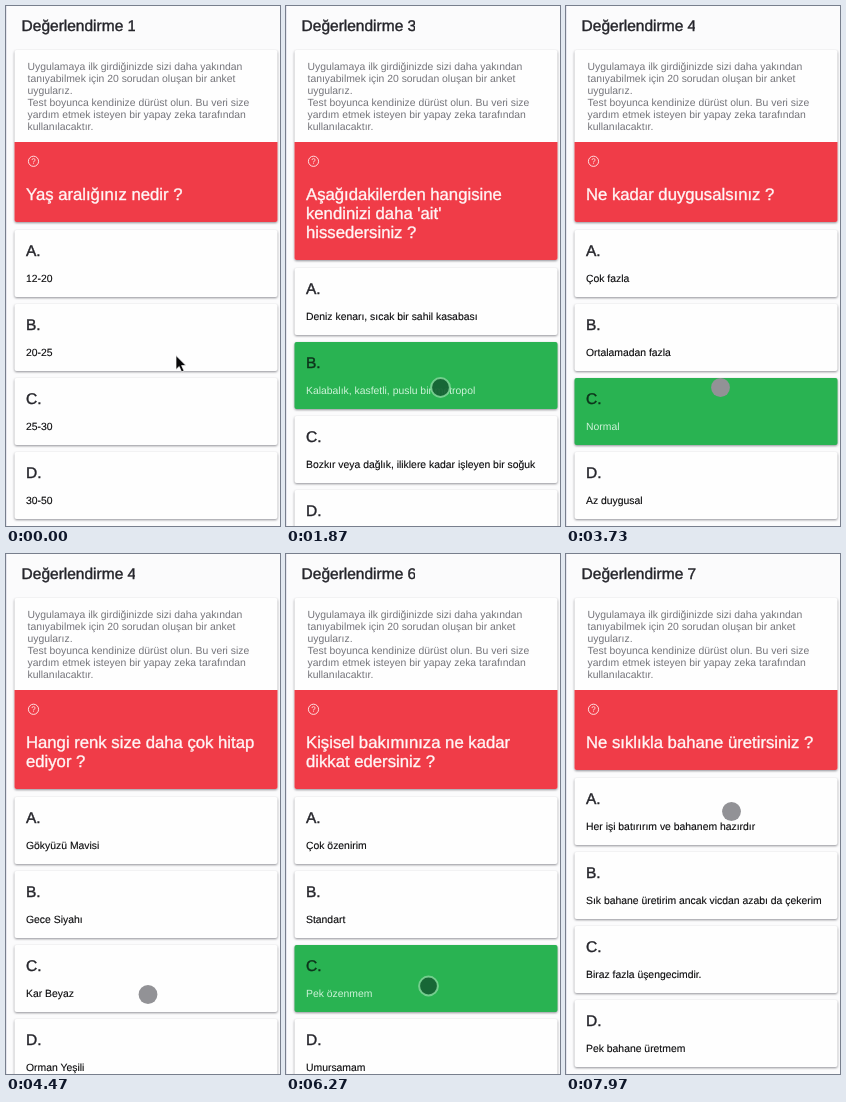
These frames come from a looping animation (274x520 px, 8000 ms). An HTML page:

```html
<!DOCTYPE html>
<html lang="tr">
<head>
<meta charset="utf-8">
<title>Değerlendirme</title>
<style>
  html, body { margin: 0; width: 100%; height: 100%; overflow: hidden; background: #fbfbfc; }
  svg { display: block; width: 100vw; height: 100vh; }
  text { font-family: "Liberation Sans", Arial, sans-serif; white-space: pre; text-rendering: geometricPrecision; }
  .card { filter: drop-shadow(0 1px 1px rgba(40, 40, 50, .5)); }
  .head { font-size: 15.5px; fill: #25252b; stroke: #25252b; stroke-width: .4px; }
  .intro { font-size: 10.4px; fill: #74747a; }
  .ask { font-size: 16.7px; fill: #fff6f6; stroke: #fff6f6; stroke-width: .35px; }
  .opt { font-size: 10.4px; fill: #0a0a0c; stroke: #0a0a0c; stroke-width: .12px; }
  .on .head { fill: #0d341b; stroke: #0d341b; }
  .on .opt { fill: #cdf2d8; stroke: none; }
</style>
</head>
<body>
<svg viewBox="0 0 274 520" preserveAspectRatio="none">
  <defs>
    <clipPath id="cut"><rect width="129" height="40"/></clipPath>
  </defs>
  <rect width="274" height="520" fill="#fbfbfc"/>
  <rect width="1" height="520" fill="#e6e6ee"/>
  <text id="title" class="head" x="15.6" y="25"></text>
  <g id="page"></g>
  <circle id="dot" r="9.4"/>
  <path id="arrow" d="M170 349.5v14l3.2-3 2.4 5.4 2.4-1.1-2.4-5.2h4.4z" fill="#08080a" stroke="#fff" stroke-width=".7"/>
</svg>
<script>
const LOOP = 8000;
const intro = [
  "Uygulamaya ilk girdiğinizde sizi daha yakından",
  "tanıyabilmek için 20 sorudan oluşan bir anket",
  "uygularız.",
  "Test boyunca kendinize dürüst olun. Bu veri size",
  "yardım etmek isteyen bir yapay zeka tarafından",
  "kullanılacaktır."
];

// start: question appears, tap: answer is pressed, pick: chosen row
const quiz = [
  { start: 0, tap: 750, pick: 1, ask: ["Yaş aralığınız nedir ?"],
    opts: ["12-20", "20-25", "25-30", "30-50"] },
  { start: 1130, tap: 1830, pick: 1, ask: ["Aşağıdakilerden hangisine", "kendinizi daha 'ait'", "hissedersiniz ?"],
    opts: ["Deniz kenarı, sıcak bir sahil kasabası", "Kalabalık, kasfetli, puslu bir metropol",
           "Bozkır veya dağlık, iliklere kadar işleyen bir soğuk", "Karlı, sessiz bir köy"] },
  { start: 2230, tap: 3530, pick: 2, ask: ["Ne kadar duygusalsınız ?"],
    opts: ["Çok fazla", "Ortalamadan fazla", "Normal", "Az duygusal"] },
  { start: 3930, tap: 4830, pick: 2, ask: ["Hangi renk size daha çok hitap", "ediyor ?"],
    opts: ["Gökyüzü Mavisi", "Gece Siyahı", "Kar Beyaz", "Orman Yeşili"] },
  { start: 5200, tap: 6170, pick: 2, ask: ["Kişisel bakımınıza ne kadar", "dikkat edersiniz ?"],
    opts: ["Çok özenirim", "Standart", "Pek özenmem", "Umursamam"] },
  { start: 6570, tap: 7270, pick: 1, ask: ["Ne kadar sabırlısınız ?"],
    opts: ["Çok sabırlıyım", "Ortalama", "Pek sabırlı değilim", "Hiç sabretmem"] },
  { start: 7670, tap: Infinity, pick: 0, ask: ["Ne sıklıkla bahane üretirsiniz ?"],
    opts: ["Her işi batırırım ve bahanem hazırdır", "Sık bahane üretirim ancak vicdan azabı da çekerim",
           "Biraz fazla üşengecimdir.", "Pek bahane üretmem"] }
];

// [time, x, y]
const path = [
  [0, 171, 352], [170, 171, 352], [600, 151.5, 305], [1150, 151.5, 305],
  [1650, 154.5, 381.5], [3800, 154.5, 381.5], [4300, 142, 440.5], [5400, 142, 440.5],
  [5900, 142.5, 432], [6600, 142.5, 432], [7100, 152, 336], [7600, 152, 336],
  [7970, 165.5, 257.5]
];

const $ = id => document.getElementById(id);
const title = $("title"), page = $("page"), dot = $("dot"), arrow = $("arrow");

const text = (cls, x, y, s) => `<text class="${cls}" x="${x}" y="${y}">${s}</text>`;
const box = (y, h, fill) =>
  `<rect class="card" x="8.5" y="${y}" width="263" height="${h}" rx="2" fill="${fill}"/>`;

function drawPage(n, picked) {
  const q = quiz[n], shift = (q.ask.length - 1) * 19;
  let out = box(44, 172 + shift, "#fefefe");
  out += intro.map((s, i) => text("intro", 21.5, 64 + i * 12, s)).join("");
  out += `<path d="M8.5 136h263v${78 + shift}q0 2-2 2h-259q-2 0-2-2z" fill="#f03c48"/>`;
  out += `<circle cx="27.5" cy="155.3" r="5.1" fill="none" stroke="#ffeeee" stroke-width=".9"/>`;
  out += `<text x="27.5" y="158.3" font-size="8" text-anchor="middle" fill="#ffeeee">?</text>`;
  out += q.ask.map((s, i) => text("ask", 20, 193.5 + i * 19, s)).join("");
  out += q.opts.map((s, i) => {
    const y = 224 + shift + i * 74, on = picked && i === q.pick;
    return `<g class="${on ? "on" : ""}">` + box(y, 67, on ? "#29b352" : "#fefefe") +
      text("head", 20, y + 26, "ABCD"[i] + ".") + text("opt", 20, y + 52, s) + "</g>";
  }).join("");
  page.innerHTML = out;

  const num = n + 1 + (picked ? 1 : 0);
  title.textContent = "Değerlendirme " + num;
  if (num < 7) title.setAttribute("clip-path", "url(#cut)");
  else title.removeAttribute("clip-path");
}

function pointAt(t) {
  const i = path.findIndex(p => p[0] > t);
  if (i < 0) return path[path.length - 1].slice(1);
  const [t0, x0, y0] = path[i - 1], [t1, x1, y1] = path[i];
  const k = (t - t0) / (t1 - t0), e = k * k * (3 - 2 * k);
  return [x0 + (x1 - x0) * e, y0 + (y1 - y0) * e];
}

let shown = "";
function render(t) {
  const n = quiz.findLastIndex(q => q.start <= t);
  const q = quiz[n], picked = t >= q.tap;
  const key = n + ":" + picked;
  if (key !== shown) { drawPage(n, picked); shown = key; }

  const [x, y] = pointAt(t), down = t > q.tap - 60 && t < q.tap + 160;
  dot.setAttribute("cx", x);
  dot.setAttribute("cy", y);
  dot.setAttribute("fill", down ? "rgba(22,98,52,.94)" : "#929296");
  dot.setAttribute("stroke", down ? "rgba(125,212,150,.9)" : "none");
  dot.setAttribute("stroke-width", 2);
  arrow.style.display = t < 170 ? "" : "none";
  dot.style.display = t < 170 ? "none" : "";
}

const begin = performance.now();
function tick() {
  render((performance.now() - begin) % LOOP);
  requestAnimationFrame(tick);
}
tick();
</script>
</body>
</html>
```
